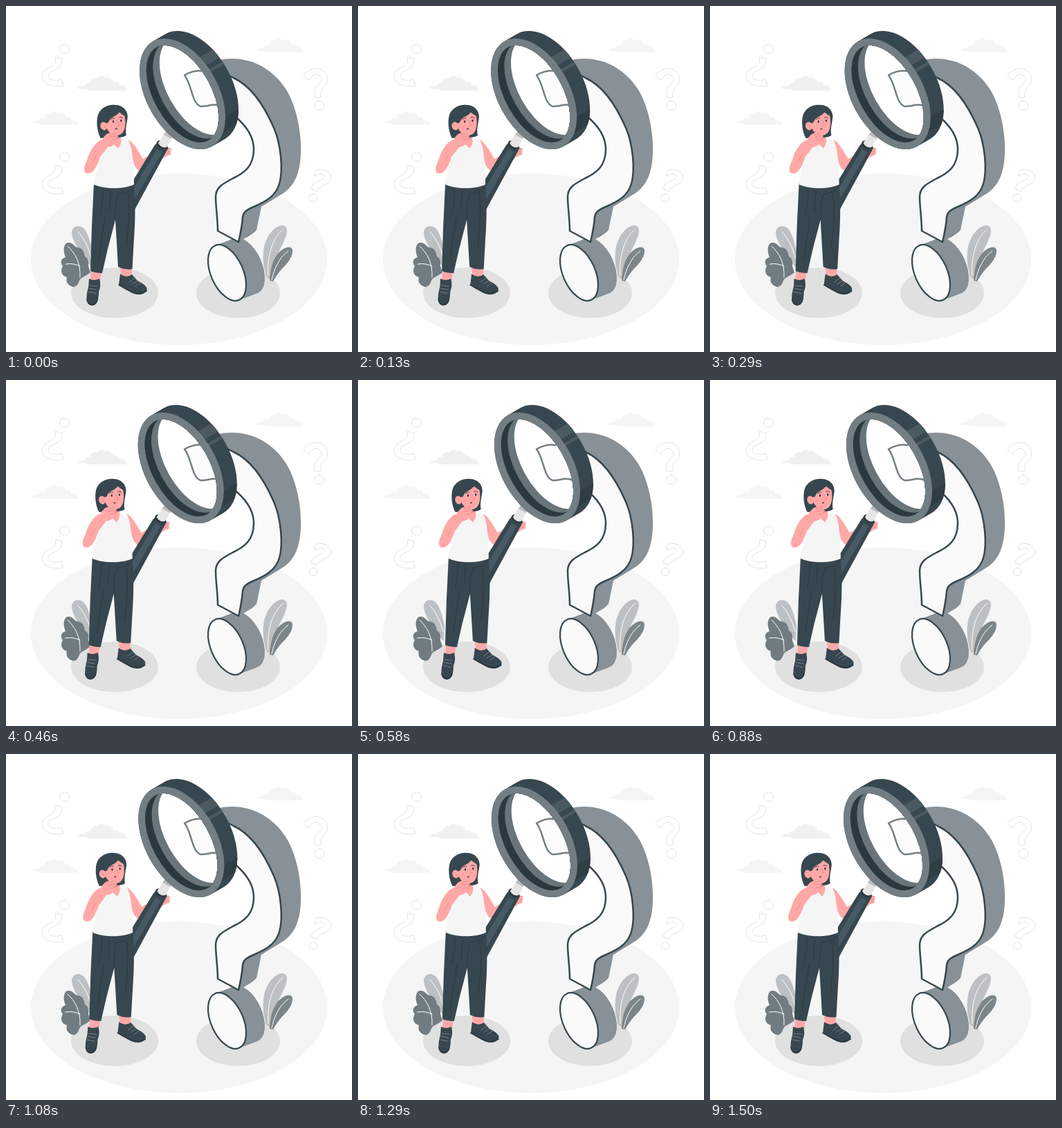
Animation of 500x500 px, one loop 1.54 s. Source, as an HTML page with a canvas:

```html
<!DOCTYPE html>
<html lang="en">
<head>
<meta charset="utf-8">
<title>Searching for an answer</title>
<style>
  html, body { margin: 0; width: 100%; height: 100%; overflow: hidden; background: #fff; }
  canvas { display: block; width: 100vw; height: 100vh; object-fit: contain; }
</style>
</head>
<body>
<canvas id="stage" width="500" height="500"></canvas>
<script>
const ctx = document.getElementById('stage').getContext('2d');
const DARK = '#37474f', DEEP = '#2b383f', SLATE = '#455a64';
const RING = '#737e84', GREY = '#69757b', SIDE = '#879197';
const SKIN = '#ffa8a7', BLUSH = '#e58482', PAPER = '#fafafa', CLOTH = '#f5f5f5';
const LOOP = 1540, FRAME = 1000 / 24, STEPS = 36;

// Horizontal shake, one value per tenth of the cycle
const SHAKE = [0, -1, 2, -4, 4, -4, 4, -4, 2, -1, 0];

function shakeAt(ms) {
  const step = Math.floor((ms % LOOP + 5) / FRAME);
  const pos = ((step + 0.5) / STEPS % 1) * 10;
  const i = Math.floor(pos);
  return SHAKE[i] + (SHAKE[i + 1] - SHAKE[i]) * (pos - i);
}

function fill(d, color) {
  ctx.fillStyle = color;
  ctx.fill(new Path2D(d));
}

function line(d, color, width = 1) {
  ctx.strokeStyle = color;
  ctx.lineWidth = width;
  ctx.stroke(new Path2D(d));
}

function oval(x, y, rx, ry = rx, tilt = 0) {
  const path = new Path2D();
  path.ellipse(x, y, rx, ry, tilt, 0, Math.PI * 2);
  return path;
}

function fillOval(color, ...shape) {
  ctx.fillStyle = color;
  ctx.fill(oval(...shape));
}

// Fills the solid swept by a shape as k goes from 0 to 1
function sweep(shapeAt, color) {
  ctx.fillStyle = color;
  for (let i = 0; i <= 12; i++) ctx.fill(shapeAt(i / 12));
}

function at(x, y, draw) {
  ctx.save();
  ctx.translate(x, y);
  draw();
  ctx.restore();
}

function cloud(x, y, color, scale = 1) {
  at(x, y, () => {
    ctx.scale(scale, scale);
    fill('M0 18C2 15 6 14 10 15C12 10 17 9 19 11C20 3 26 1 29 4C32-1 38-1 40 3C46 0 51 4 53 9C58 7 61 11 61 13C66 12 70 15 72 21H16C13 18 6 20 0 18Z', color);
  });
}

function outlineMark(d, x, y, r) {
  line(d, '#e2e2e2');
  ctx.stroke(oval(x, y, r));
}

function scenery() {
  fillOval('#f5f5f5', 250, 366, 214, 124);
  fillOval('#e0e0e0', 157, 414.5, 63, 36.5);
  fillOval('#e0e0e0', 335.5, 415, 60.5, 36);
  cloud(103, 101, '#f0f0f0');
  cloud(37, 152, '#f5f5f5', 0.94);
  cloud(362, 47, '#f5f5f5', 0.94);

  for (const y of [0, 156]) {
    at(0, y, () => outlineMark('M72 74Q76 76 81 77L80 84C78 92 63 93 61 100C59 107 72 109 80 106L83 115C70 118 51 114 52 101C53 90 69 88 71 82Z', 84.5, 62, 7));
  }
  outlineMark('M430 101C437 90 449 88 457 93C468 100 466 112 459 117C455 121 455 125 455 132L446 132C446 124 445 119 451 114C457 109 458 104 452 100C447 97 441 100 438 107Z', 453, 144, 7);
  outlineMark('M447 238C455 234 468 237 470 247C471 257 458 258 452 263L449 268L441 264C442 256 449 254 456 251C463 248 461 243 456 243C452 243 449 245 446 246Z', 444, 277, 5.7);
}

function plants() {
  fill('M124 378C112 364 96 342 95 328C95 318 105 315 112 321C119 328 122 342 125 354Z', '#bdc1c4');
  line('M104 326C113 336 120 350 123 364', '#fff');
  fill('M97 406C90 404 86 399 88 392C80 390 78 382 82 376C78 371 79 365 86 363C82 354 83 344 89 342C96 341 98 347 103 349C111 349 113 356 114 362C120 365 119 371 119 376L122 385C115 391 108 392 106 397C104 403 101 406 97 406Z', '#717c82');
  line('M89 347C99 356 108 370 107 392M86 373Q97 371 107 376', '#fff');

  fill('M376 391C370 370 369 348 380 331C388 319 400 313 405 320C409 329 399 345 392 360C387 373 383 382 382 395Z', '#bdc1c4');
  line('M400 323C386 335 377 358 379 390', '#fff');
  fill('M381 397C382 377 387 361 398 353C406 347 414 347 414 354C414 366 403 375 396 383Q390 390 386 398Z', '#7b858a');
  line('M408 354C395 363 387 380 384 396', '#fff');
}

function bigMark() {
  ctx.lineJoin = 'round';
  const dot = k => oval(319.5 + 27 * k, 385.5 - 10 * k, 23.3, 43, -0.417);
  sweep(dot, SIDE);
  ctx.fillStyle = PAPER;
  ctx.fill(dot(0));
  ctx.strokeStyle = DARK;
  ctx.lineWidth = 2.2;
  ctx.stroke(dot(0));

  fill('M308 78C345 70 383 86 405 121C420 146 427 182 426 213C425 240 418 259 400 271L369 290L362 324C355 331 345 336 336 341L338 298L385 260L375 160L320 103Z', SIDE);
  const face = 'M258 100Q272 92 284 94C300 91 315 96 329 104C355 116 374 146 387 176C397 199 401 236 395 257C389 277 372 284 356 291C347 295 343 298 342 305Q341 320 336 341L306 325C306 307 303 291 303 275C304 260 316 256 328 249C345 241 358 231 358 207C358 188 347 174 335 163C324 152 316 145 304 143C294 142 290 146 281 145C268 140 269 114 258 100Z';
  fill(face, PAPER);
  line(face, DARK, 2.5);
}

function magnifier() {
  const tilt = -0.51, cx = 255, cy = 127, dx = 19, dy = -11;
  const outer = k => oval(cx + dx * k, cy + dy * k, 51.8, 87, tilt);
  const opening = k => oval(cx + dx * k, cy + dy * k, 41.5, 77, tilt);
  const outside = path => {
    const rest = new Path2D('M150 0H380V260H150Z');
    rest.addPath(path);
    return rest;
  };
  const band = (x1, y1, x2, y2, color) =>
    fill(`M${x1} ${y1}l24-14L${x2 + 24} ${y2 - 14}L${x2} ${y2}Z`, color);

  ctx.save();
  ctx.clip(outside(opening(0)), 'evenodd');
  sweep(outer, DARK);
  ctx.save();
  ctx.clip(outer(1));
  band(280, 74, 289, 86, '#4b5a61');
  band(293, 92, 295, 96, '#4b5a61');
  band(314, 162, 312, 184, '#2f3d44');
  ctx.restore();
  ctx.fillStyle = RING;
  ctx.fill(outer(0));
  ctx.restore();

  ctx.save();
  ctx.clip(opening(0));
  ctx.fillStyle = 'rgba(255,255,255,.3)';
  ctx.fill(opening(1));
  ctx.fillStyle = GREY;
  ctx.fill(outside(opening(1)), 'evenodd');
  ctx.fillStyle = DEEP;
  ctx.fill(outside(opening(0.5)), 'evenodd');
  ctx.restore();
}

function handle() {
  fill('M215 201Q225 191 234.5 205L185 296L172 271Z', DARK);
  fill('M218 207L226 211L185 281L180 271Z', SLATE);
  fillOval(DEEP, 225.5, 200.5, 8.5, 5.5, 0.5);
  fill('M231 181L242 187L232 204Q224 206 220 198Z', '#e6e6e6');
  fill('M231 181L242 187L239 192L228 186Z', '#bdbdbd');
}

function legs() {
  fill('M123 380L138 383L136 398Q128 401 122 396Z', SKIN);
  fill('M164 375L182 377L182 391Q174 395 167 391Z', SKIN);
  fill('M120 394Q127 398 135 394Q138 404 134 413C134 424 132 433 124 433C116 432 116 424 117 415Q120 405 120 394Z', DARK);
  line('M117 424C118 434 130 434 132 424', DEEP, 1.6);
  line('M121 404L132 405M120 408L131 410M119 413L130 415', '#7b878d', 0.9);
  fill('M165 387Q174 394 182 388L190 397C199 402 206 406 203 412C198 419 187 418 179 413L163 403Z', DARK);
  line('M163 403C176 411 190 420 203 412', DEEP, 1.6);
  line('M178 399L186 393M182 402L190 397M187 405L194 400', '#7b878d', 0.9);

  fill('M127 256L185 256C187 282 187 307 185 335L182.5 380Q172 382 162 377L158 309L147 351L139 386Q129 386 122 383L124 318Z', DARK);
  line('M158 309Q157 288 162 272M162 272Q175 271 184 263M140 265Q141 285 136 301M152 266Q149 282 150 296M176 270Q180 300 174 346M143 305Q138 337 134 365', DEEP, 0.9);
}

function backArm() {
  fill('M177 193C185 198 191 209 198 221L215 211L228 207C232 206 235 203 239 206L238 210L238 215C233 216 229 218 222 224L198 239C190 239 186 233 184 225Z', SKIN);
  line('M230 210L236 210M229 213L236 213', BLUSH, 0.7);
}

function torso() {
  fill('M148 178L166 181L166 194L171 197L162 208L147 195Z', SKIN);
  fill('M149 187Q158 190 165 185L165 190Q157 195 149 190Z', BLUSH);
  fill('M138 193L150 191Q155 200 162 206Q167 200 167 192L177 194C182 203 182 214 184 227L185 258C170 265 143 265 127 258C128 243 135 230 135 216C134 207 135 200 138 193Z', CLOTH);
  line('M150 191Q155 200 162 206Q167 200 167 192', '#e5e5e5', 0.8);
}

function head() {
  fill('M136 191C130 181 129 163 133 155C138 146 148 142 157 143C168 143 175 151 175 160C174 170 171 178 173 187Q167 191 160 189Z', DARK);
  fill('M145 161C149 154 168 150 171 160C173 173 171 186 160 187C150 188 144 178 143 171Z', SKIN);
  fillOval(SKIN, 140.5, 173.5, 4.8, 6, -0.3);
  line('M138 171Q142 171 142 176', BLUSH, 0.8);
  fill('M143 169C144 163 140 153 148 148C159 142 172 148 174 159Q168 159 163 153C160 159 151 160 148 166Q147 170 143 169Z', DARK);
  fillOval(DEEP, 154.3, 167, 1.2, 1.7);
  fillOval(DEEP, 165.5, 165.8, 1.2, 1.7);
  line('M151 164Q153 161 156 162M163 161Q166 160 168 162', DEEP, 0.9);
  line('M160 166Q162 171 164 172L161 173', BLUSH, 0.9);
  fillOval('#7c3f43', 158.5, 177.5, 1.6, 1.1, -0.2);
}

function frontArm() {
  fill('M138 193C128 198 121 209 117 223C112 234 111 242 119 242C127 242 132 230 136 218L147 204C155 203 158 199 158 193L162 188Q160 185 155 187L160 183Q160 180 156 181L148 184C144 185 140 190 138 196Z', SKIN);
  line('M159 183L149 187M160 188L150 190M158 193L152 194M132 215Q128 219 126 225', BLUSH, 0.8);
}

function render(now) {
  ctx.clearRect(0, 0, 500, 500);
  ctx.lineCap = 'round';
  scenery();
  plants();
  bigMark();
  at(shakeAt(now) + 0.15, 0, () => {
    backArm();
    handle();
    magnifier();
    legs();
    torso();
    at(0.8, 0, head);
    frontArm();
  });
}

let start;
function tick(now) {
  start ??= now;
  render(now - start);
  requestAnimationFrame(tick);
}
render(0);
requestAnimationFrame(tick);
</script>
</body>
</html>
```
